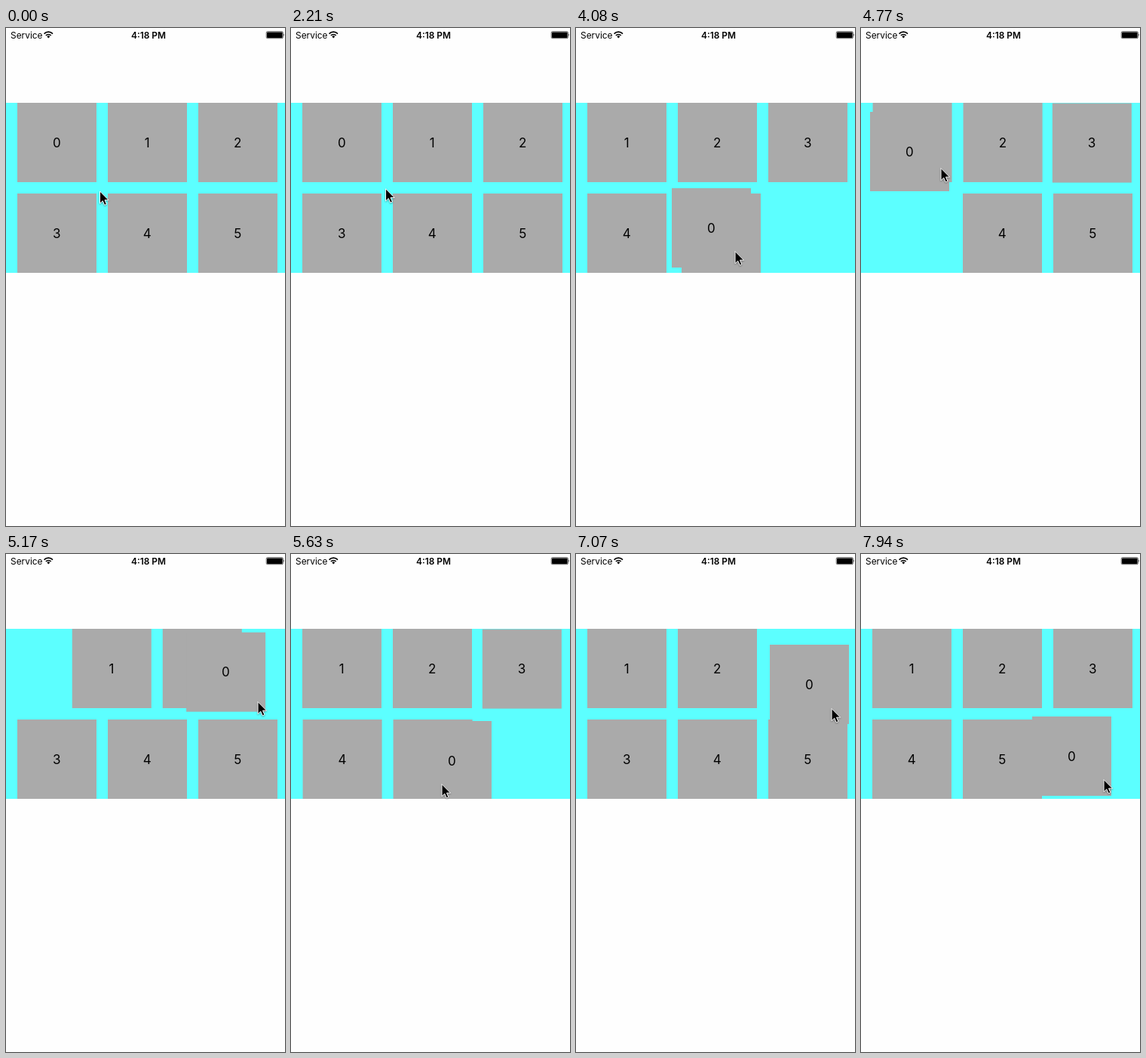
An HTML page that plays this animation: 370 px wide and 659 px high, repeating every 8000 ms.

```html
<!DOCTYPE html>
<html lang="en">
<head>
<meta charset="utf-8">
<title>Grid reorder</title>
<style>
  html, body { margin: 0; width: 100%; height: 100%; overflow: hidden; background: #fefefe; }
  svg { display: block; width: 100vw; height: 100vh; }
  text { font-family: Inter, Roboto, "Liberation Sans", sans-serif; fill: #000; }
  .tile text { font-size: 17px; text-anchor: middle; }
  .status { font-size: 11.9px; }
  #cursor { filter: drop-shadow(0 1px 1px rgba(0, 0, 0, .35)); }
</style>
</head>
<body>
<svg viewBox="0 0 370 659">
  <defs><clipPath id="gridClip"><rect y="99" width="370" height="225"/></clipPath></defs>
  <rect width="370" height="659" fill="#fefefe"/>

  <text class="status" x="6" y="13.6">Service</text>
  <g fill="none" stroke="#000" stroke-width="1.7">
    <path d="M50.6 7.6a8 8 0 0 1 11.4 0"/>
    <path d="M52.9 9.9a4.8 4.8 0 0 1 6.8 0"/>
  </g>
  <path d="M56.3 13.4l-2-2.1a2.9 2.9 0 0 1 4 0z"/>
  <text class="status" x="189" y="13.6" text-anchor="middle" font-weight="600">4:18 PM</text>
  <rect x="345.2" y="4.7" width="22.2" height="9" rx="1.6" fill="none" stroke="#000" stroke-width=".6"/>
  <rect x="346" y="5.5" width="20.6" height="7.4" rx=".9"/>
  <path d="M368.3 7.6q1.4 1.6 0 3.2z"/>

  <g clip-path="url(#gridClip)">
    <rect y="99" width="370" height="225" fill="#5cffff"/>
    <g id="tiles"></g>
  </g>
  <path id="cursor" d="M0 0V16.2L3.7 12.7L6.2 18.4L8.9 17.2L6.5 11.7H11.6Z"
        stroke="#fff" stroke-width="1" stroke-linejoin="round"/>
</svg>
<script>
const LOOP = 8000, DRAG_START = 2870, TICK = 57.33, MOVE_TICKS = 4.9;

// Dragged tile's corner: [tick, x, y]
const dragPath = [
  [0, 15, 99], [1, 42, 99], [2, 85, 99], [4, 153, 100], [5, 175, 100], [8, 242, 104],
  [11, 254, 150], [13, 250, 190], [17, 195, 214], [20, 131, 212], [21, 127, 212],
  [22, 129, 212], [28, 25, 212], [31, 11, 160], [33, 12, 111], [34, 24, 102],
  [36, 95, 99], [39, 215, 100], [41, 252, 112], [43, 255, 165], [45, 240, 213],
  [48, 161, 221], [49, 118, 221], [51, 45, 218], [53, 14, 205], [55, 9, 165],
  [57, 10, 125], [59, 28, 104], [62, 130, 100], [65, 235, 102], [68, 262, 117],
  [72, 262, 117], [73, 257, 120], [74, 257, 121], [76, 255, 165], [78, 238, 205],
  [81, 204, 218], [85, 204, 218], [88, 227, 215], [89, 240, 215], [91, 262, 215]
];

// Slot the dragged tile claims: [tick, slot]
const claims = [
  [2.1, 1], [7.3, 2], [13, 5], [20.4, 4], [26, 3], [32.8, 0], [37.9, 2],
  [43.3, 5], [48.3, 4], [53.2, 3], [58.1, 0], [63, 2], [75.5, 5]
];

const clamp = v => Math.max(0, Math.min(1, v));
const smooth = v => { v = clamp(v); return v * v * (3 - 2 * v); };
const mix = (a, b, p) => a + (b - a) * p;
const place = (el, x, y) => el.setAttribute("transform", `translate(${x.toFixed(2)} ${y.toFixed(2)})`);

const slotXY = slot => [15 + 120 * (slot % 3), 99 + 120 * Math.floor(slot / 3)];
const slotOf = (n, claimed) => n <= claimed ? n - 1 : n;

function slope(i, axis) {
  const a = dragPath[i], b = dragPath[i + 1];
  return a && b ? (b[axis] - a[axis]) / (b[0] - a[0]) : 0;
}

function tangent(i, axis) {
  const before = slope(i - 1, axis), after = slope(i, axis);
  return before * after > 0 ? 2 * before * after / (before + after) : 0;
}

// Monotone cubic, so the tile never overshoots its key positions
function dragAt(tick) {
  const last = dragPath.length - 1;
  if (tick <= 0) return dragPath[0].slice(1);
  if (tick >= dragPath[last][0]) return dragPath[last].slice(1);
  const i = dragPath.findIndex(key => key[0] > tick) - 1;
  const a = dragPath[i], b = dragPath[i + 1], span = b[0] - a[0], u = (tick - a[0]) / span;
  return [1, 2].map(axis =>
    mix(a[axis], b[axis], smooth(u)) +
    span * u * (1 - u) * ((1 - u) * tangent(i, axis) - u * tangent(i + 1, axis)));
}

function tileAt(n, tick) {
  let from = 0, to = 0, start = 0;
  for (const [at, slot] of claims) {
    if (at > tick) break;
    from = to; to = slot; start = at;
  }
  const p = smooth((tick - start) / MOVE_TICKS);
  const a = slotXY(slotOf(n, from)), b = slotXY(slotOf(n, to));
  return a.map((v, k) => mix(v, b[k], p));
}

function cursorAt(time, tick) {
  if (tick >= 0) {
    const [x, y] = dragAt(tick + 1);
    return [tick < 1 ? 97 : x + 82, y + 83.5];
  }
  const nudge = smooth((time - 725) / 225), reach = smooth((time - 2160) / 550);
  return [124.5 + 2 * nudge - 40 * reach, 216 - 2.5 * nudge - 31 * reach];
}

const tileLayer = document.getElementById("tiles");
const cursor = document.getElementById("cursor");
const tiles = [];
for (const n of [1, 2, 3, 4, 5, 0]) {
  tileLayer.insertAdjacentHTML("beforeend",
    `<g class="tile"><rect width="105" height="105" fill="#aaa"/><text x="52.3" y="58.6">${n}</text></g>`);
  tiles[n] = tileLayer.lastElementChild;
}

function draw(time) {
  const tick = Math.floor((time - DRAG_START) / TICK);
  tiles.forEach((tile, n) => place(tile, ...(n ? tileAt(n, tick) : dragAt(tick))));
  place(cursor, ...cursorAt(time, tick));
}

let begin;
function loop(now) {
  begin ??= now;
  draw((now - begin) % LOOP);
  requestAnimationFrame(loop);
}
draw(0);
requestAnimationFrame(loop);
</script>
</body>
</html>
```
